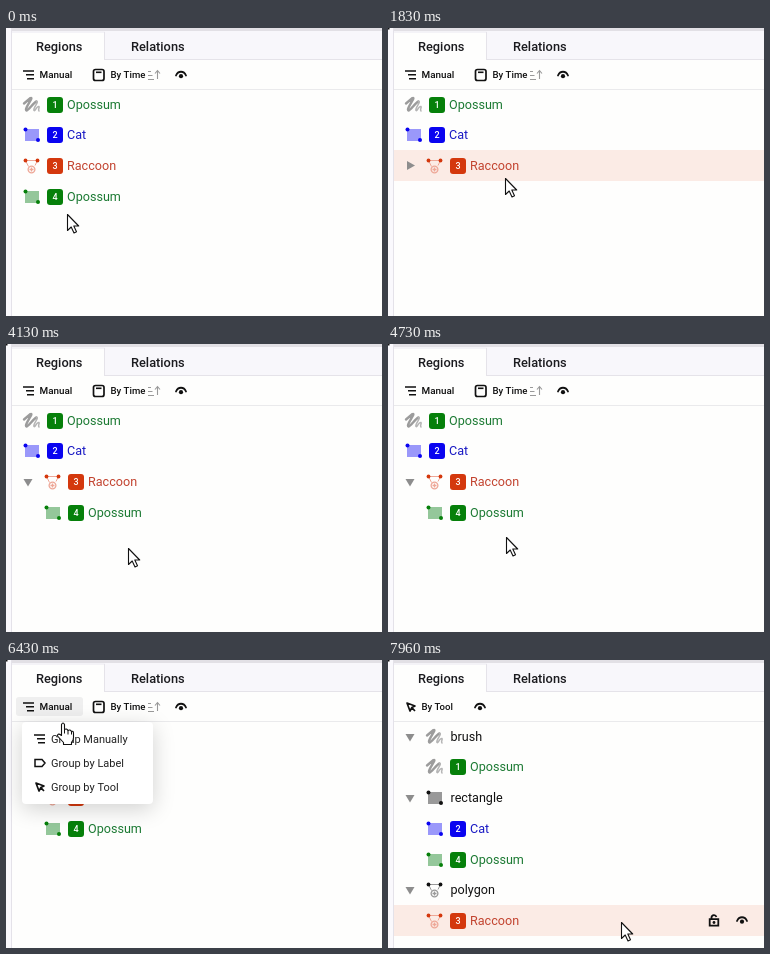
These frames come from a looping animation (376 px wide and 288 px high, 8 s). An HTML page with a canvas:

```html
<!DOCTYPE html>
<html lang="en">
<head>
<meta charset="utf-8">
<title>Regions panel</title>
<style>
html, body { margin: 0; width: 100%; height: 100%; overflow: hidden; background: #fefefd; }
canvas { display: block; }
</style>
</head>
<body>
<canvas id="stage" width="376" height="288"></canvas>
<script>
const ctx = document.getElementById('stage').getContext('2d');
const LOOP = 8000, ROW = 30.75, FIRST = 76.1;
const DRAG_START = 930, DRAG_END = 1730, DROPPED = 1800, TOOLS_SHOWN = 2030;
const EXPANDED = 3490, MENU_OPEN = 5830, MENU_PICK = 7000, GROUPED = 7030;
const GRAB = { x: 79, y: 169 };

const GREEN = { badge: '#06800a', text: '#1c7a33', hover: '#e5f2e3', fill: '#94c79a' };
const BLUE = { badge: '#0a04f0', text: '#1a1ac4', hover: '#e6e6fd', fill: '#9a98fa' };
const RED = { badge: '#d4380d', text: '#c2432f', hover: '#fbebe5', fill: '#eea797' };
const DARK = { badge: '#111', text: '#111', fill: '#999' };

const region = (num, name, tool, tone) => ({ num, name, tool, tone });
const group = tool => ({ name: tool, tool, tone: DARK, arrow: 'down', level: 1 });
const child = item => ({ ...item, level: 1 });
const brushRegion = region(1, 'Opossum', 'brush', GREEN);
const cat = region(2, 'Cat', 'rectangle', BLUE);
const raccoon = region(3, 'Raccoon', 'polygon', RED);
const boxRegion = region(4, 'Opossum', 'rectangle', GREEN);

const flatList = [brushRegion, cat, raccoon, boxRegion];
const collapsedList = [brushRegion, cat, { ...raccoon, level: 1, arrow: 'right' }];
const expandedList = [brushRegion, cat, { ...raccoon, level: 1, arrow: 'down' }, child(boxRegion)];
const groupedList = [
  group('brush'), child(brushRegion),
  group('rectangle'), child(cat), child(boxRegion),
  group('polygon'), child(raccoon)
];

// time, x, y, linear
const pointer = [
  [0, 61, 186], [30, 61, 186], [460, GRAB.x, GRAB.y], [DRAG_START, GRAB.x, GRAB.y],
  [1200, 110, 153, true], [1560, 117, 150], [2530, 117, 150], [3060, 18, 141],
  [3930, 18, 141], [4130, 122, 204], [4630, 122, 204], [5260, 57, 41],
  [6230, 57, 41], [6800, 50, 117], [7230, 50, 117], [7330, 52, 116],
  [7800, 146, 195, true], [7960, 233, 262, true], [LOOP, 233, 262]
];

const clamp = v => Math.max(0, Math.min(1, v));
const progress = (t, start, end) => clamp((t - start) / (end - start));
const rowY = i => Math.floor(FIRST + i * ROW);

function pointerAt(t) {
  const i = Math.max(1, pointer.findIndex(p => p[0] > t));
  const [t0, x0, y0] = pointer[i - 1], [t1, x1, y1, linear] = pointer[i];
  const p = progress(t, t0, t1), k = linear ? p : p * p * (3 - 2 * p);
  return { x: Math.round(x0 + (x1 - x0) * k), y: Math.round(y0 + (y1 - y0) * k) };
}

function at(x, y, draw) {
  ctx.save();
  ctx.translate(x, y);
  draw();
  ctx.restore();
}
function rect(x, y, w, h, color) {
  ctx.fillStyle = color;
  ctx.fillRect(x, y, w, h);
}
function rounded(x, y, w, h, r, color) {
  ctx.fillStyle = color;
  ctx.beginPath();
  ctx.roundRect(x, y, w, h, r);
  ctx.fill();
}
function dot(x, y, r, color) {
  ctx.fillStyle = color;
  ctx.beginPath();
  ctx.arc(x, y, r, 0, 7);
  ctx.fill();
}
function stroke(path, color, width) {
  ctx.strokeStyle = color;
  ctx.lineWidth = width;
  ctx.stroke(new Path2D(path));
}
function fill(path, color) {
  ctx.fillStyle = color;
  ctx.fill(new Path2D(path));
}
function text(value, x, y, size, color, weight = 400, align = 'left') {
  ctx.font = `${weight} ${size}px Roboto, sans-serif`;
  ctx.textAlign = align;
  ctx.fillStyle = color;
  ctx.fillText(value, x, y);
}

const toolIcons = {
  brush() {
    ctx.lineCap = ctx.lineJoin = 'round';
    stroke('M-7.5-1L-1-6.5C3-8-8 5-5 6C-3 6 2-2 5-3', '#9c9c9c', 2.4);
    stroke('M5-3C8-3 1 4 2.500 6C4 7 5 1 7.500 2C8.500 3 6 5 7.500 6.500', '#b4b4b4', 1.5);
  },
  rectangle(tone) {
    rect(-6.5, -5.5, 14, 12, tone.fill);
    dot(-6, -5, 2, tone.badge);
    dot(6.5, 5.5, 2, tone.badge);
  },
  polygon(tone) {
    stroke('M-6-5H6M-6-5L-3 1M6-5L3.500 0', tone.fill, 1);
    dot(-6, -5, 1.9, tone.badge);
    dot(6, -5, 1.9, tone.badge);
    stroke('M3.4 4A3.4 3.4 0 1 1-3.4 4A3.4 3.4 0 1 1 3.4 4M-2 4H2M0 2V6', tone.fill, 1.3);
  }
};

function drawEye(x, y) {
  at(x, y, () => {
    ctx.lineCap = 'round';
    stroke('M-5 .5C-3-4.5 3-4.5 5 .5', '#111', 1.8);
    dot(0, 1.2, 2.1, '#111');
  });
}
function drawLock(x, y) {
  at(x, y, () => {
    stroke('M-4.3-1.3H4.3V5.2H-4.3ZM-2.5-1.5V-3.2A2.5 2.5 0 0 1 2.4-3.6', '#111', 1.8);
    dot(0, 2, 1.4, '#111');
  });
}
function drawListIcon(x, y) {
  at(x, y, () => stroke('M-6-4H5M-3-.2H5M-2 3.8H5', '#111', 1.6));
}
function drawToolIcon(x, y) {
  at(x, y, () => {
    ctx.lineJoin = 'round';
    stroke('M-4-4L4-1L.8.6L-1 4ZM.8.6L4 4', '#111', 1.7);
  });
}

function drawRow(row, y, showTools) {
  const indent = row.level ? 21 : 0;
  if (row.arrow) {
    at(22, y + .5, () => fill(row.arrow === 'down' ? 'M-4.5-2.5H4.5L0 5Z' : 'M-3-4.5L5 0L-3 4.5Z', '#8d8d8d'));
  }
  at(25.5 + indent, y + .5, () => toolIcons[row.tool](row.tone));
  if (row.num) {
    rounded(41 + indent, y - 7, 16, 16, 3, row.tone.badge);
    text(row.num, 49 + indent, y + 4, 9, '#fff', 500, 'center');
  }
  text(row.name, row.num ? 61 + indent : 62.5, y + 5, 12.6, row.tone.text);
  if (showTools) {
    drawLock(326, y + .5);
    drawEye(354, y + .5);
  }
}

function drawTabs() {
  rect(0, 0, 376, 288, '#fefefd');
  rect(0, 0, 5, 288, '#faf9fd');
  rect(5, 0, 1, 288, '#e4e2e9');
  rect(6, 0, 370, 3, '#e2e0e5');
  rect(99, 3, 277, 28, '#f8f7fb');
  rect(6, 3, 93, 2, '#f4f3f7');
  rect(98, 4, 1, 28, '#e5e3e9');
  rect(98, 31, 278, 1, '#e5e3e9');
  text('Regions', 30, 23, 12.8, '#1b1b1f', 500);
  text('Relations', 125, 23, 12.8, '#1b1b1f', 500);
}

function drawToolbar(grouped, active) {
  rect(6, 61, 370, 1, '#eaeaec');
  if (active) rounded(10, 37, 67, 19, 3, '#efefef');
  if (grouped) {
    drawToolIcon(23, 47);
    text('By Tool', 33.5, 50, 9.6, '#111', 500);
    drawEye(92, 47);
    return;
  }
  drawListIcon(23, 47);
  text('Manual', 33.5, 50, 9.9, '#111', 500);
  ctx.strokeStyle = '#111';
  ctx.lineWidth = 1.7;
  ctx.beginPath();
  ctx.roundRect(87.5, 41.5, 10.5, 11, 2);
  ctx.stroke();
  rect(90, 43.5, 5.5, 1.6, '#111');
  text('By Time', 104.5, 50, 9.6, '#111', 500);
  stroke('M151.5 51V43M149 45.5L151.5 42.5L154 45.5M142 51.5H148M142 47.5H146.5M142 43.5H145', '#999', 1.1);
  drawEye(175, 47);
}

function drawMenu(alpha, p) {
  if (!alpha) return;
  ctx.save();
  ctx.globalAlpha = alpha;
  ctx.shadowColor = 'rgba(0,0,0,.18)';
  ctx.shadowBlur = 22;
  ctx.shadowOffsetY = 5;
  rounded(16, 62, 131, 82, 4, '#fff');
  ctx.shadowColor = 'transparent';
  ['Group Manually', 'Group by Label', 'Group by Tool'].forEach((label, i) => {
    const top = 67 + i * 24, mid = top + 12;
    if (p.y >= top && p.y < top + 24) rounded(23, top, 117, 24, 3, '#f1f1f1');
    if (i === 0) drawListIcon(34, mid);
    if (i === 1) at(34, mid, () => stroke('M-5-3.5H2L5 0L2 3.5H-5Z', '#111', 1.5));
    if (i === 2) drawToolIcon(34, mid);
    text(label, 45, mid + 4, 11, '#222');
  });
  ctx.restore();
}

function drawPointer(p, hand, dragging) {
  at(p.x + .5, p.y + .5, () => {
    ctx.lineJoin = 'round';
    const shape = hand
      ? 'M0 1Q1.500-2 3 1V6Q5 4.500 6.500 7Q8.500 5.500 10 8Q12 7 12 10V14Q12 17 10 19V21H2V19L-4 12.500Q-4 9 0 12Z'
      : 'M0 0V16L3.700 12.500L6.500 18.500L9 17.300L6.300 11.500H11.200Z';
    fill(shape, '#fff');
    stroke(shape, '#111', 1.1);
    if (hand) stroke('M3 5V10M6.500 7V11M10 8V11', '#111', 1);
    if (dragging) {
      ctx.setLineDash([2, 1]);
      stroke('M4 16H15V25H4Z', '#111', 1);
      ctx.setLineDash([]);
      rect(10.500, 20.500, 7, 7, '#fff');
      stroke('M11 21H17V27H11ZM12 24H16M14 22V26', '#111', 1);
    }
  });
}

function drawDrag(p) {
  const dx = p.x - GRAB.x, y = rowY(3) + p.y - GRAB.y;
  ctx.save();
  ctx.globalAlpha = .45;
  at(dx, 0, () => drawRow(boxRegion, y));
  ctx.globalAlpha = .13;
  drawLock(326 + dx, y);
  ctx.restore();
  const left = p.y < 152 ? 50 : 29;
  rect(left, 151, 376 - left, 1, '#8f2a35');
}

function render(t) {
  const p = pointerAt(t);
  const dragging = t >= DRAG_START && t < DRAG_END;
  const menuAlpha = progress(t, MENU_OPEN, MENU_OPEN + 180) * (1 - progress(t, MENU_PICK, MENU_PICK + 130));
  const menuActive = t >= MENU_OPEN && t < GROUPED;
  const grouped = t >= GROUPED;
  const rows = t < DROPPED ? flatList : t < EXPANDED ? collapsedList : grouped ? groupedList : expandedList;
  const overButton = p.x >= 10 && p.x < 77 && p.y >= 37 && p.y < 56;
  const held = t >= DRAG_START && t < DROPPED;
  const hovered = held ? 3 : menuActive ? -1 : Math.floor((p.y - FIRST) / ROW + .5);

  drawTabs();
  drawToolbar(grouped, overButton || menuActive);
  rows.forEach((row, i) => {
    const y = rowY(i), active = i === hovered && row.num;
    if (active) rect(6, y - 15, 370, 31, row.tone.hover);
    drawRow(row, y, active && !(t >= DROPPED && t < TOOLS_SHOWN));
  });
  if (dragging) drawDrag(p);
  drawMenu(menuAlpha, p);
  if (t >= 30) rect(0, 0, 1.5, 1.5, '#111');
  drawPointer(p, overButton || menuActive, dragging);
}

const began = performance.now();
function tick() {
  render((performance.now() - began) % LOOP);
  requestAnimationFrame(tick);
}
tick();
</script>
</body>
</html>
```
